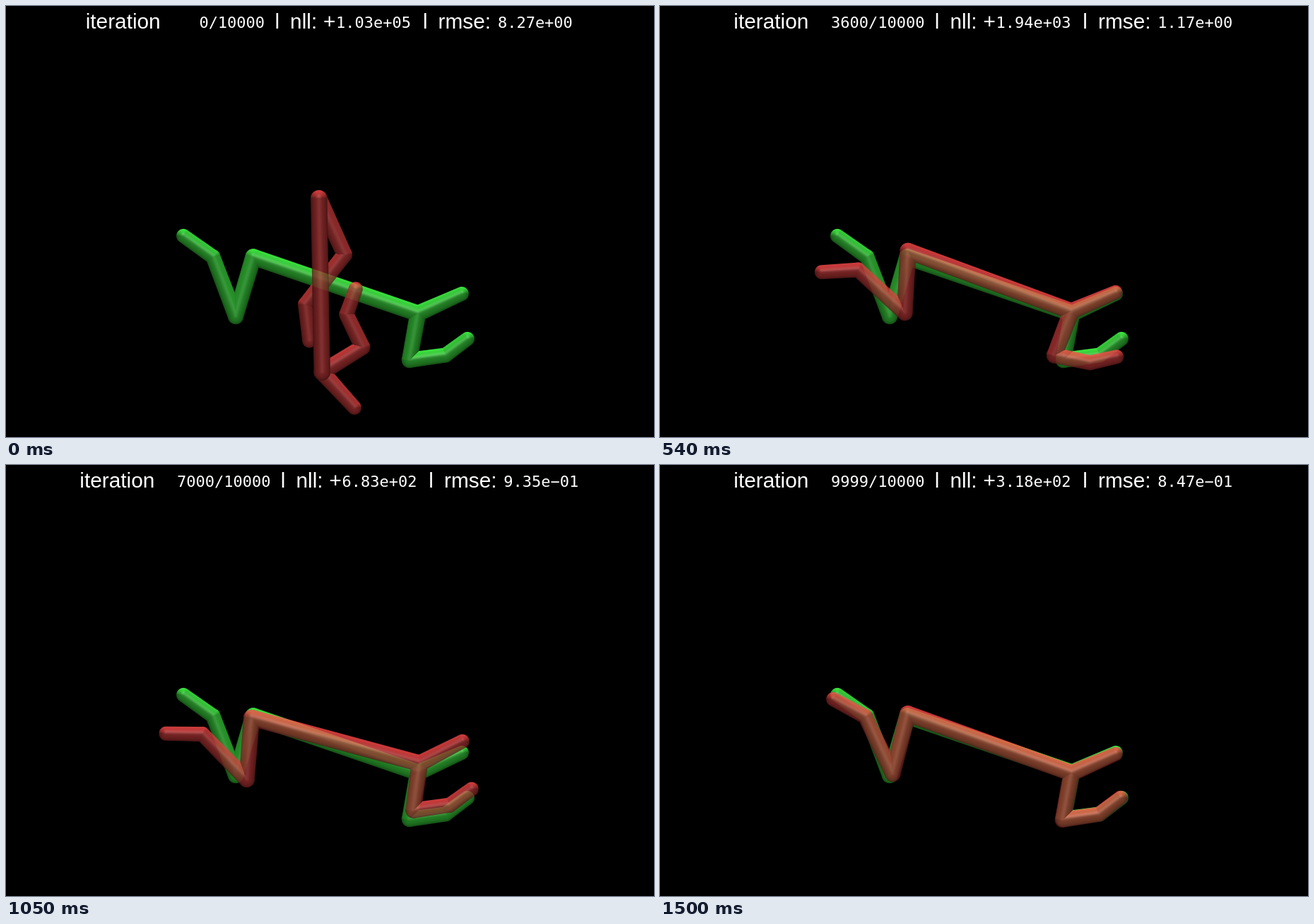
Animation, 917 px wide and 611 px high, one loop 2530 ms. Source, as an HTML page with a canvas:

```html
<!DOCTYPE html>
<html lang="en">
<head>
<meta charset="utf-8">
<title>Skeleton fit</title>
<style>
html, body { margin: 0; width: 100%; height: 100%; overflow: hidden; background: #000; }
canvas, svg { position: absolute; left: 0; top: 0; display: block; }
text { fill: #fff; font: 29.8px "Liberation Sans", Arial, sans-serif; white-space: pre; }
text.num { font: 22px "DejaVu Sans Mono", monospace; }
</style>
</head>
<body>
<canvas id="stage" width="917" height="611"></canvas>
<svg width="917" height="611">
  <text id="label" y="31.8">iteration</text>
  <g id="rest">
    <text class="num" id="iter" x="374.5" y="31" text-anchor="end"></text>
    <text x="388.8" y="31.8">l</text>
    <text x="410.5" y="31.8">nll:</text>
    <text x="457.5" y="31.8">+</text>
    <text class="num" id="nll" x="475.5" y="31"></text>
    <text x="598.3" y="31.8">l</text>
    <text x="620" y="31.8">rmse:</text>
    <text class="num" id="rmse" x="704.3" y="31"></text>
  </g>
</svg>
<script>
const STEP = 30, LAST = 50, LOOP = 2530, SETTLE = 9;
const X0 = 190, Y0 = 240, W = 490, H = 360;
const GREEN = [74, 280, 78], RED = [330, 95, 95];

// hip, knee, heel, toe, shoulder, head, elbow, wrist, finger
const TRUTH = [[350, 356], [325, 440], [293, 356], [251, 326], [583, 436],
  [645, 408], [571, 502], [622, 495], [653, 472]];

// Joints, then degrees off at the start and shares of hind fold, fore reach and tilt
const BONES = [
  [0, 4, 70, 0, 0, 1],
  [0, 1, -41, 0.35, 0, 0],
  [1, 2, -121, 0.68, 0, 0],
  [2, 3, -132, 1, 0, 0],
  [4, 5, 72, 0, 0, 0.8],
  [4, 6, -132, 0, 0.4, 0.8],
  [6, 7, -108, 0, 0.8, 0.2],
  [7, 8, -34, 0, 1, 0]
];

// step, nll, rmse, fold, reach, tilt
const FIT = [
  [0, 1.03e5, 8.27, 0, 0, 0],
  [9, 4450, 1.65, -14, 31, 2.9],
  [18, 1940, 1.17, -39, 24, 1.3],
  [26, 1560, 1.18, -47, 22, 1.4],
  [30, 707, 1.12, -48, -1, -5.3],
  [40, 659, 0.78, -21, 2, -2.3],
  [50, 318, 0.847, -7, -1, 1]
];

const $ = id => document.getElementById(id);
const lerp = (a, b, u) => a + (b - a) * u;
const geo = (a, b, u) => a * Math.pow(b / a, u);
const clamp = (v, lo, hi) => Math.max(lo, Math.min(hi, v));
const decay = step => Math.max(0, (Math.exp(-3 * step / SETTLE) - Math.exp(-3)) / (1 - Math.exp(-3)));

// Limbs get thinner away from the trunk
const level = [0, 1, 2, 3, 0, 3, 1, 2, 3];
const radius = joint => 11.7 - 0.55 * level[joint];

// Turn every bone off its true angle, keeping lengths and chains
function pose(off, fold, reach, tilt) {
  const joints = [];
  BONES.forEach(([i, j, start, f, r, t], n) => {
    const vx = TRUTH[j][0] - TRUTH[i][0], vy = TRUTH[j][1] - TRUTH[i][1];
    const turn = (start * off + f * fold + r * reach + t * tilt) * Math.PI / 180;
    const c = Math.cos(turn), s = Math.sin(turn);
    const dx = vx * c - vy * s, dy = vx * s + vy * c;
    if (!n) {
      const mx = TRUTH[i][0] + vx / 2 - 21.5 * off;
      const my = TRUTH[i][1] + vy / 2 + 0.15 * fold;
      joints[i] = [mx - dx / 2, my - dy / 2];
    }
    joints[j] = [joints[i][0] + dx, joints[i][1] + dy];
  });
  return joints;
}

// Shaded capsules, nearest surface wins, then laid over the backdrop
function render(base, joints, color, opacity, front) {
  const pix = new Float32Array(base.length);
  const depth = new Float32Array(W * H).fill(-1e3);
  const cover = new Float32Array(W * H);
  BONES.forEach(([i, j], n) => {
    const [ax, ay] = joints[i], [bx, by] = joints[j];
    const vx = bx - ax, vy = by - ay, len2 = vx * vx + vy * vy;
    const x1 = clamp(Math.floor(Math.min(ax, bx) - 13 - X0), 0, W);
    const x2 = clamp(Math.ceil(Math.max(ax, bx) + 13 - X0), 0, W);
    const y1 = clamp(Math.floor(Math.min(ay, by) - 13 - Y0), 0, H);
    const y2 = clamp(Math.ceil(Math.max(ay, by) + 13 - Y0), 0, H);
    for (let y = y1; y < y2; y++) for (let x = x1; x < x2; x++) {
      const px = x + X0 + 0.5 - ax, py = y + Y0 + 0.5 - ay;
      const t = clamp((px * vx + py * vy) / len2, 0, 1);
      const r = lerp(radius(i), radius(j), t);
      const dx = px - vx * t, dy = py - vy * t, d = Math.hypot(dx, dy);
      const edge = clamp(r - d + 0.5, 0, 1);
      if (!edge) continue;
      const k = y * W + x, ny = dy / r, nz = Math.sqrt(Math.max(0, 1 - d * d / (r * r)));
      const z = nz * r + (n ? 0 : front), near = z > depth[k];
      const light = 0.2 + 0.24 * nz + 0.56 * Math.max(0, -ny);
      const shine = 42 * Math.pow(Math.max(0, 0.97 * nz - 0.24 * ny), 24);
      const under = near ? edge : edge * (1 - cover[k]);
      for (let c = 0; c < 3; c++) {
        const q = k * 3 + c, v = Math.min(255, color[c] * light + shine);
        pix[q] = (near ? pix[q] * (1 - edge) : pix[q]) + v * under;
      }
      cover[k] += edge * (1 - cover[k]);
      if (near) depth[k] = z;
    }
  });
  return pix.map((v, q) => base[q] * (1 - opacity * cover[q / 3 | 0]) + v * opacity);
}

const ctx = $("stage").getContext("2d");
const image = ctx.createImageData(W, H);
const backdrop = render(new Float32Array(W * H * 3), TRUTH, GREEN, 1, 0);

function sci(v) {
  const [m, e] = v.toExponential(2).split("e");
  return m + "e" + (e[0] === "-" ? "−" : "+") + e.slice(1).padStart(2, "0");
}

function draw(step) {
  const next = Math.max(1, FIT.findIndex(row => row[0] >= step));
  const a = FIT[next - 1], b = FIT[next], off = decay(step);
  const u = next === 1 ? 1 - off : (step - a[0]) / (b[0] - a[0]);
  const [fold, reach, tilt] = [3, 4, 5].map(k => lerp(a[k], b[k], u));

  const pix = render(backdrop, pose(off, fold, reach, tilt), RED, 0.78, 14 * off);
  for (let k = 0; k < W * H; k++) {
    for (let c = 0; c < 3; c++) image.data[k * 4 + c] = pix[k * 3 + c];
    image.data[k * 4 + 3] = 255;
  }
  ctx.putImageData(image, X0, Y0);

  const count = String(Math.min(step * 200, 9999));
  const shift = (4 - count.length) * 2.8;
  $("label").setAttribute("x", 104.3 + shift);
  $("rest").setAttribute("transform", `translate(${-shift} 0)`);
  $("iter").textContent = count + "/10000";
  $("nll").textContent = sci(geo(a[1], b[1], u));
  $("rmse").textContent = sci(geo(a[2], b[2], u));
}

const start = performance.now();
let shown = 0;
function tick(now) {
  const time = Math.max(0, now - start) % LOOP;
  const step = Math.min(LAST, Math.floor(time / STEP));
  if (step !== shown) draw(shown = step);
  requestAnimationFrame(tick);
}
draw(0);
requestAnimationFrame(tick);
</script>
</body>
</html>
```
